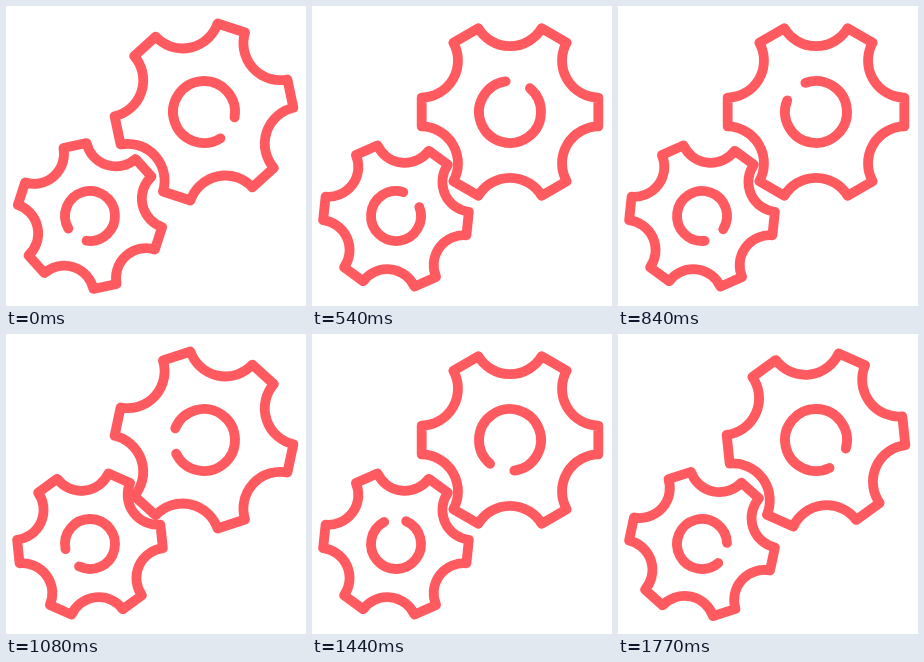
An HTML page that plays this animation: 300 px wide and 300 px high, repeating every 1.8 s.

```html
<!DOCTYPE html>
<html lang="en">
<head>
<meta charset="utf-8">
<title>Turning gears</title>
<style>
  html, body { margin: 0; width: 100%; height: 100%; overflow: hidden; background: #fff; }
  svg { display: block; width: 100vw; height: 100vh; }
  path { fill: none; stroke: #ff5a5f; stroke-width: 9.8; stroke-linejoin: round; stroke-linecap: round; }
</style>
</head>
<body>
<svg viewBox="0 0 300 300">
  <g transform="translate(198 106)"><path id="bigGear"/><path id="bigArc"/></g>
  <g transform="translate(84 210)"><path id="smallGear"/><path id="smallArc"/></g>
</svg>
<script>
const LOOP = 1800, STEP = 30, TEETH = 6;
const el = id => document.getElementById(id);

function polar(radius, degrees) {
  const a = degrees * Math.PI / 180;
  return `${(radius * Math.cos(a)).toFixed(2)} ${(radius * Math.sin(a)).toFixed(2)}`;
}

// Flat teeth joined by circular valleys; the radius is that of the tooth corners.
function gearPath(radius) {
  const half = 9.3, valley = radius * 0.412;
  let d = `M${polar(radius, -half)}`;
  for (let i = 0; i < TEETH; i++) {
    const a = i * 360 / TEETH;
    d += `L${polar(radius, a + half)}A${valley} ${valley} 0 0 0 ${polar(radius, a + 60 - half)}`;
  }
  return d + 'Z';
}

// Open ring whose gap is centred on angle zero.
const ringPath = (radius, gap) =>
  `M${polar(radius, gap / 2)}A${radius} ${radius} 0 1 1 ${polar(radius, -gap / 2)}`;

const turn = (id, degrees) => el(id).setAttribute('transform', `rotate(${degrees})`);

function draw(t) {
  const spin = 360 * t / LOOP;
  turn('bigGear', -12 - spin);
  turn('bigArc', 34 - spin);
  turn('smallGear', 18 + spin);
  turn('smallArc', 124 + 1.75 * spin);
}

el('bigGear').setAttribute('d', gearPath(89.5));
el('bigArc').setAttribute('d', ringPath(31, 48));
el('smallGear').setAttribute('d', gearPath(73));
el('smallArc').setAttribute('d', ringPath(25, 52));

const start = performance.now();
function tick() {
  const t = Math.max(0, performance.now() - start) % LOOP;
  draw(Math.floor(t / STEP) * STEP);
  requestAnimationFrame(tick);
}
draw(0);
tick();
</script>
</body>
</html>
```
